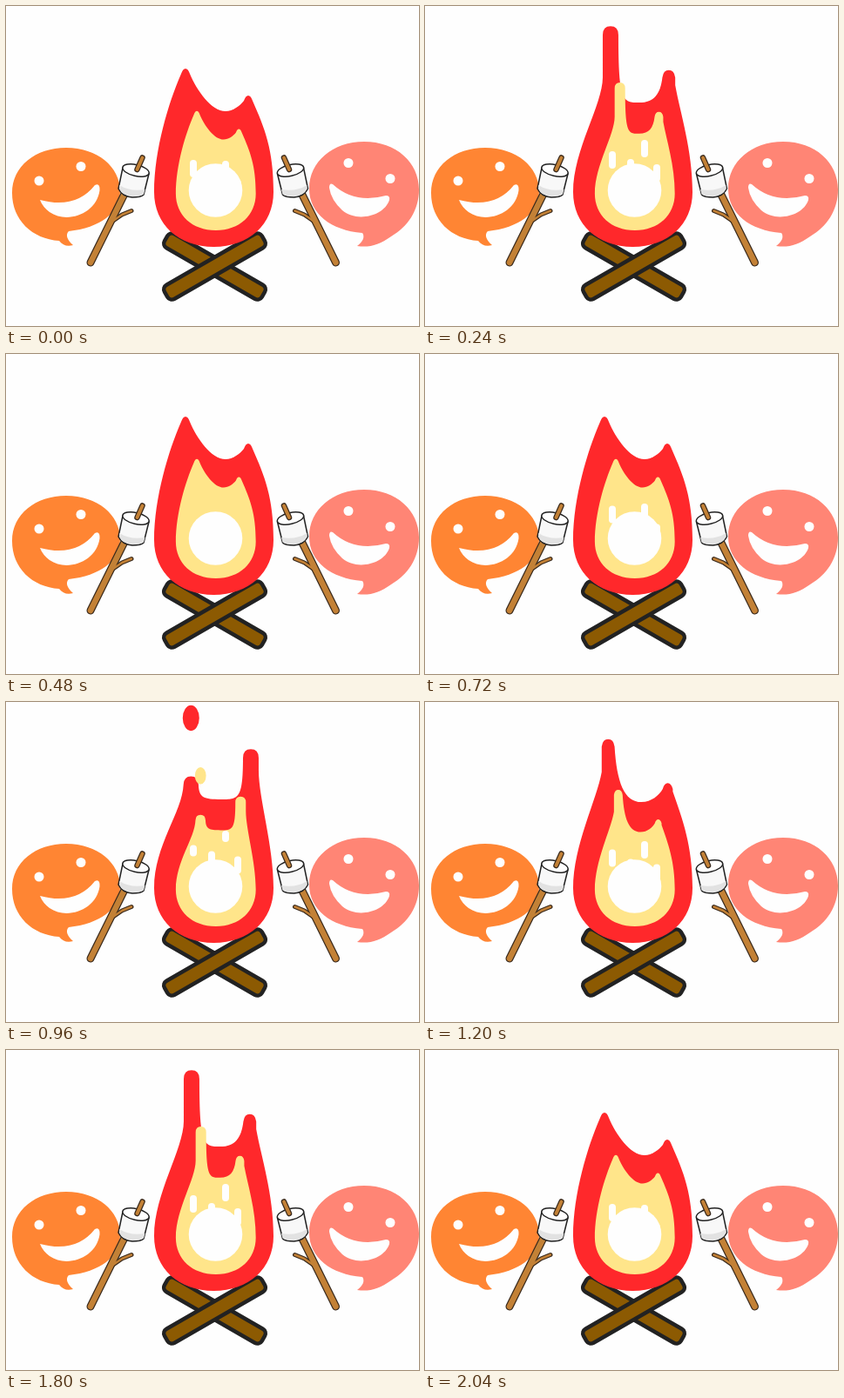
Animation of 474 by 368 pixels, one loop 2.16 s. Source, as an HTML page:

```html
<!DOCTYPE html>
<html lang="en">
<head>
<meta charset="utf-8">
<title>Campfire</title>
<style>
html, body { margin: 0; width: 100%; height: 100%; overflow: hidden; background: #fefefe; }
svg { display: block; width: 474px; height: 368px; }
</style>
</head>
<body>
<svg viewBox="0 0 474 368">
  <defs>
    <g id="stick" stroke-linecap="round" stroke-linejoin="round" fill="none">
      <g stroke="#3a2a1c">
        <path d="M123 247 133 240 144 235.500" stroke-width="5"/>
        <path d="M138 212 97 295" stroke-width="9"/>
      </g>
      <g stroke="#c38136">
        <path d="M138 212 97 295" stroke-width="6.500"/>
        <path d="M123 247 133 240 144 235.500" stroke-width="2.500"/>
      </g>
      <path d="M134 186 129 210Q133 219 145 220Q155 220 158 217L164 193Z" fill="#f8f8f8" stroke="#222" stroke-width="1.500"/>
      <path d="M130 206Q143 214 159.500 211L158 216.500Q154 219 145 219Q134 218 130 210Z" fill="#e2e2e2"/>
      <ellipse cx="149" cy="189" rx="15.500" ry="6.500" transform="rotate(13 149 189)" fill="#fff" stroke="#222" stroke-width="1.500"/>
      <path d="M156.500 174.500 150.500 188" stroke="#3a2a1c" stroke-width="6.500"/>
      <path d="M156.500 174.500 150.500 188" stroke="#c38136" stroke-width="4"/>
    </g>
    <rect id="log" x="-64.500" y="-9.250" width="129" height="18.500" rx="6" fill="#8c5a02" stroke="#222" stroke-width="4.500"/>
  </defs>

  <path fill="#ff8533" d="M69 163C105 163 131 185 131 213C131 238 108 255 72 259C68 263 70 269 77 275C70 277 65 275 61 270C30 268 7 246 7 215C7 184 34 163 69 163Z"/>
  <path fill="#ff8575" d="M411 156C448 156 474 180 474 211C474 235 461 254 442 265C428 275 417 278 403 276C410 271 412 265 409 261C373 258 348 239 348 210C348 179 375 156 411 156Z"/>
  <g fill="#fefefe">
    <circle cx="38" cy="201" r="5.500"/><circle cx="86" cy="184.500" r="5.500"/>
    <path d="M39 223Q80 234 102 206Q108 203 107.500 212C104 239 70 251 50 237Q42 231 39 223Z"/>
    <circle cx="393" cy="180.500" r="5.500"/><circle cx="441" cy="198.500" r="5.500"/>
    <path d="M375 205Q400 228 436 218Q441 218 440 223C434 242 402 249 386 235Q373 223 371 209Q371 203 375 205Z"/>
  </g>

  <use href="#log" transform="translate(239.500 299.500) rotate(30)"/>
  <use href="#log" transform="translate(239.500 299.500) rotate(-30)"/>

  <path id="flame" fill="#ff282b"/>
  <use href="#flame" id="core"/>
  <path id="coreFlame" fill="#ffe58a" transform="translate(81 72.400) scale(.67)"/>
  <g id="sparks" fill="#fefefe"><circle cx="240.500" cy="212" r="30.800"/></g>

  <use href="#stick"/>
  <use href="#stick" transform="translate(475.500 0) scale(-1 1)"/>
</svg>
<script>
const STEP = 120, STEPS = 18, CYCLE = 5.5;
const SPLIT = 2.4, FULL_RISE = 49;
const BODY = { left: 170, right: 307, mid: 214, bottom: 277 };
const LEFT = { x: 206, y: 72, side: -1, delay: 0, drift: 7, stem: 1 };
const RIGHT = { x: 278, y: 103, side: 1, delay: .5, drift: 3, stem: .3 };
const SPARKS = [
  { x: 215, y: 177, speed: 5, delay: 0 },
  { x: 252, y: 178, speed: 12, delay: 0 },
  { x: 236, y: 194, speed: 9, delay: .5 },
  { x: 266, y: 200, speed: 9, delay: .5 }
];

const $ = id => document.getElementById(id);
const clamp = v => Math.max(0, Math.min(1, v));

// A tongue stretches upwards, sheds a drop and settles back.
function tongue({ x, y, side, delay, drift, stem }, phase) {
  const p = phase - delay;
  const rise = 39 * Math.max(0, p - .75);
  const settle = 1 - clamp(p - SPLIT);
  const split = p >= SPLIT;
  const stretch = split ? settle : clamp(rise / FULL_RISE);
  const tipX = x + drift * stretch;
  const tipY = y + (split ? 15 * settle : -rise);
  const w = 5 + 4 * stretch;
  return {
    x: tipX, y: tipY, side, stretch,
    inX: tipX - side * w, outX: tipX + side * w, sideY: tipY + w + 1,
    bend: side * w * (.6 + .4 * stretch),
    stem: split ? 0 : rise * stem,
    drop: split && p < SPLIT + .5 ? ellipse(tipX, y - rise + 14.7, 9.5, 14.7) : ''
  };
}

function ellipse(x, y, rx, ry) {
  return `M${x - rx} ${y}a${rx} ${ry} 0 1 1 ${2 * rx} 0a${rx} ${ry} 0 1 1 ${-2 * rx} 0Z`;
}

// Handles of the curves that join a tongue to the body and to the valley.
function outerHandle(t) {
  return [t.outX + t.side * 14 * (1 - t.stretch), t.sideY + t.stem + 32];
}
function innerHandles(t, vx, vy) {
  const gap = vx - t.inX, s = t.stretch;
  return {
    tip: [t.inX + gap * .2 * (1 - s), t.sideY + (vy - t.sideY) * (.45 + .55 * s * s)],
    valley: [vx - gap * (.4 + .4 * s), vy]
  };
}

function flamePath(phase) {
  const l = tongue(LEFT, phase), r = tongue(RIGHT, phase);
  const { left, right, mid, bottom } = BODY;
  const x = (left + right) / 2;
  const vx = 252 - 6 * l.stretch, vy = 121 - 10 * l.stretch;
  const li = innerHandles(l, vx, vy), ri = innerHandles(r, vx, vy);
  return [
    'M', x, bottom, 'C', left + 28, bottom, left, mid + 37, left, mid,
    'C', left, mid - 49, ...outerHandle(l), l.outX, l.sideY + l.stem, 'V', l.sideY,
    'Q', l.x + l.bend, l.y, l.x, l.y, 'Q', l.x - l.bend, l.y, l.inX, l.sideY,
    'C', ...li.tip, ...li.valley, vx, vy,
    'C', ...ri.valley, ...ri.tip, r.inX, r.sideY,
    'Q', r.x - r.bend, r.y, r.x, r.y, 'Q', r.x + r.bend, r.y, r.outX, r.sideY,
    'V', r.sideY + r.stem, 'C', ...outerHandle(r), right, mid - 49, right, mid,
    'C', right, mid + 37, right - 28, bottom, x, bottom, 'Z', l.drop, r.drop
  ].join(' ');
}

function set(el, attrs) {
  for (const name in attrs) el.setAttribute(name, attrs[name]);
}

$('core').remove();
const sparkNodes = SPARKS.map(() =>
  $('sparks').appendChild(document.createElementNS('http://www.w3.org/2000/svg', 'rect')));

function draw(phase) {
  const d = flamePath(phase);
  set($('flame'), { d });
  set($('coreFlame'), { d });
  SPARKS.forEach(({ x, y, speed, delay }, i) => {
    const height = Math.max(0, 20 - 14 * Math.max(0, phase - 2 - delay));
    const width = height ? 8 : 0;
    set(sparkNodes[i], { x: x - 4, y: y - speed * phase, width, height, rx: 4 });
  });
}

// The flicker runs forwards for half the loop, then backwards.
const start = performance.now();
function tick() {
  const n = Math.floor((performance.now() - start) / STEP) % STEPS;
  draw(Math.min(n, STEPS - 1 - n) % CYCLE);
  requestAnimationFrame(tick);
}
tick();
</script>
</body>
</html>
```
